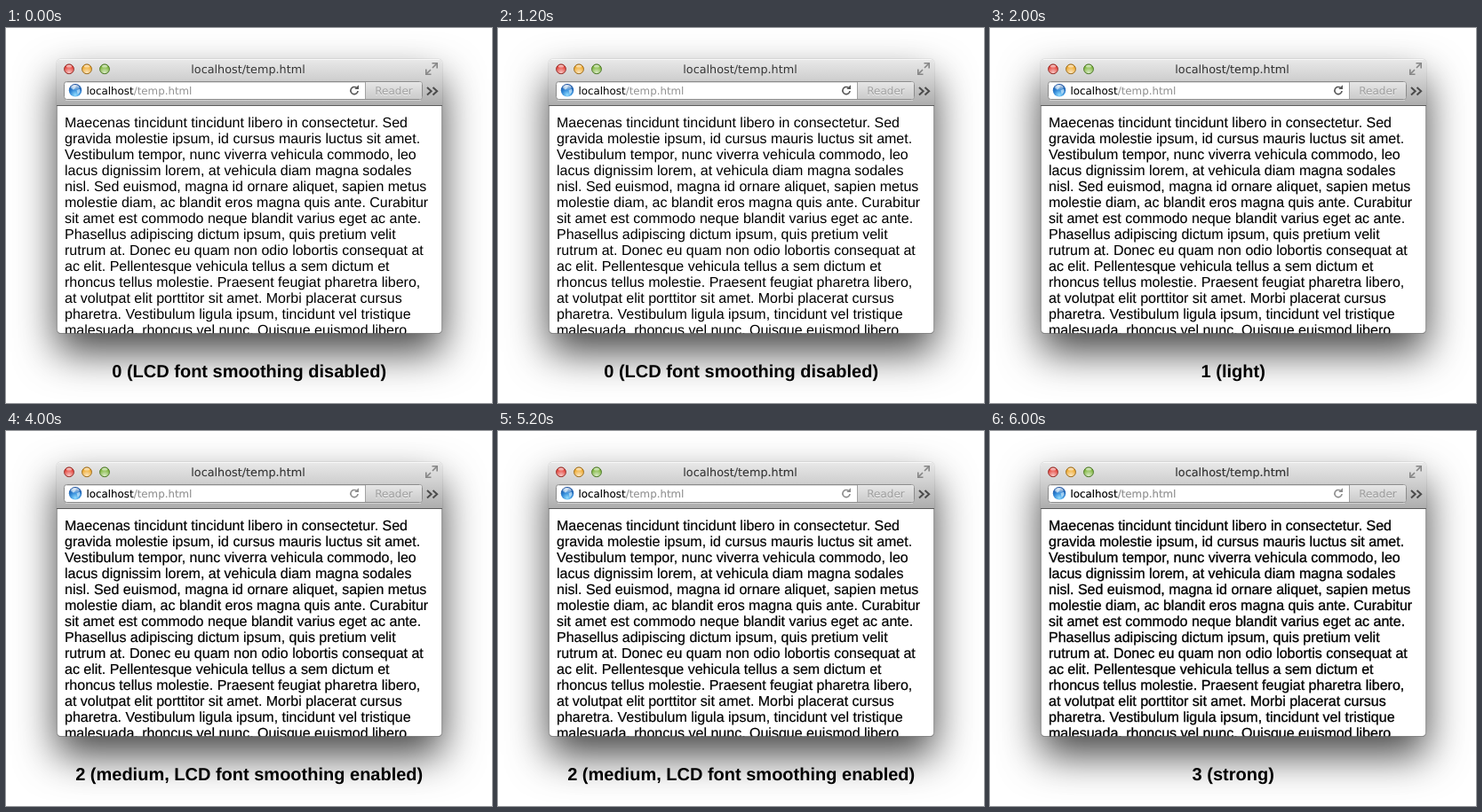
Write an HTML page that moves like this. It is 547x423 px and loops after 8 s.

```html
<!DOCTYPE html>
<html lang="en">
<head>
<meta charset="utf-8">
<title>Font smoothing levels</title>
<style>
html, body { margin: 0; width: 100%; height: 100%; overflow: hidden; background: #fff; }
#shadow {
  position: absolute; left: 57px; top: 35px; width: 434px; height: 309px;
  border-radius: 5px; box-shadow: 0 22px 46px rgba(0,0,0,.72), 0 0 1px rgba(0,0,0,.5);
}
svg { position: absolute; left: 0; top: 0; display: block; }
text { text-rendering: geometricPrecision; white-space: pre; }
.ui { font-family: "DejaVu Sans", sans-serif; stroke-width: calc(var(--w) * .6); }
.page { font: 16px "Liberation Sans", Arial, sans-serif; fill: #000; stroke: #000; stroke-width: var(--w); }
.caption { font: bold 20px "Liberation Sans", Arial, sans-serif; text-anchor: middle; }
</style>
</head>
<body>
<div id="shadow"></div>
<svg id="stage" width="547" height="423" viewBox="0 0 547 423">
  <defs>
    <linearGradient id="chrome" x2="0" y2="1">
      <stop offset="0" stop-color="#e9e9e9"/>
      <stop offset=".45" stop-color="#cfcfcf"/>
      <stop offset="1" stop-color="#adadad"/>
    </linearGradient>
    <linearGradient id="button" x2="0" y2="1">
      <stop offset="0" stop-color="#e6e6e6"/>
      <stop offset="1" stop-color="#cbcbcb"/>
    </linearGradient>
    <linearGradient id="gloss" x2="0" y2="1">
      <stop offset="0" stop-color="#fff" stop-opacity=".85"/>
      <stop offset="1" stop-color="#fff" stop-opacity=".1"/>
    </linearGradient>
    <radialGradient id="globe" cx=".5" cy=".85" r=".85">
      <stop offset="0" stop-color="#8fdcff"/>
      <stop offset=".5" stop-color="#2f86d6"/>
      <stop offset="1" stop-color="#174a98"/>
    </radialGradient>
    <radialGradient id="lamp" cx=".5" cy=".9" r=".7">
      <stop offset="0" stop-color="#fff" stop-opacity=".7"/>
      <stop offset="1" stop-color="#fff" stop-opacity="0"/>
    </radialGradient>
    <clipPath id="frame"><rect x="57" y="35" width="434" height="309.5" rx="5"/></clipPath>
  </defs>

  <g clip-path="url(#frame)">
    <rect x="57" y="35" width="434" height="310" fill="#fff"/>
    <rect x="57" y="35" width="434" height="52" fill="url(#chrome)"/>
    <path d="M60 35.5H488" stroke="#f8f8f8"/>
    <path d="M57 87.5H491" stroke="#5c5c5c"/>
    <g id="lights"></g>

    <text class="ui" x="272.5" y="51" font-size="12.8" text-anchor="middle" fill="#fff" opacity=".5">localhost/temp.html</text>
    <text class="ui" x="272.5" y="50.5" font-size="12.8" text-anchor="middle" fill="#333" stroke="#333">localhost/temp.html</text>

    <g fill="none" stroke="#858585" stroke-width="1.6">
      <path d="M480 45L484.5 40.5M478 47L473.5 51.5"/>
      <path d="M479.5 39.8H485.2V45.5M472.8 46.5V52.2H478.5"/>
    </g>

    <rect x="65.5" y="60.5" width="403" height="20" rx="3" fill="#fff" stroke="#8b8b8b"/>
    <path d="M67 61.5H404" stroke="#ddd"/>
    <path d="M404.5 61H466Q468 61 468 63V78Q468 80 466 80H404.5Z" fill="url(#button)"/>
    <path d="M404.5 61V80" stroke="#a2a2a2"/>
    <path d="M67 81.5H467" stroke="#fff" opacity=".4"/>

    <circle cx="78" cy="70.3" r="7.2" fill="url(#globe)"/>
    <path d="M74 67Q76 63.8 79 65.2L78 68L75.5 69.8ZM79.5 70L83 68.8L83.6 72L80.8 75Z" fill="#d9f1ff" opacity=".65"/>
    <ellipse cx="77.7" cy="67" rx="5" ry="3" fill="url(#gloss)"/>

    <text class="ui" x="90.5" y="75" font-size="11.85" fill="#000" stroke="#000">localhost<tspan fill="#929292" stroke="#929292">/temp.html</tspan></text>

    <g id="reload" fill="none" stroke="currentColor" stroke-width="1.6">
      <path d="M394.4 67.2A4.1 4.1 0 1 0 396.1 71"/>
      <path d="M392.3 69.1H397V64.3Z" fill="currentColor" stroke="none"/>
    </g>

    <text class="ui" x="436.5" y="76" font-size="12" text-anchor="middle" fill="#fff" opacity=".7">Reader</text>
    <text class="ui" x="436.5" y="75" font-size="12" text-anchor="middle" fill="#a0a0a0" stroke="#a0a0a0">Reader</text>
    <path d="M474 67L478.7 71.3L474 75.6M480.5 67L485.2 71.3L480.5 75.6" fill="none" stroke="#4b4b4b" stroke-width="2"/>

    <g id="page" class="page"></g>
  </g>
  <path d="M57.5 88V340Q57.5 344.5 62 344.5H486Q490.5 344.5 490.5 340V88" fill="none" stroke="#444" stroke-opacity=".5"/>
  <text id="caption" class="caption" x="273.7" y="394"></text>
</svg>

<script>
const NS = "http://www.w3.org/2000/svg";
const $ = id => document.getElementById(id);

function add(parent, tag, attrs, text = "") {
  const el = document.createElementNS(NS, tag);
  for (const key in attrs) el.setAttribute(key, attrs[key]);
  el.textContent = text;
  parent.append(el);
}

const lines = [
  "Maecenas tincidunt tincidunt libero in consectetur. Sed",
  "gravida molestie ipsum, id cursus mauris luctus sit amet.",
  "Vestibulum tempor, nunc viverra vehicula commodo, leo",
  "lacus dignissim lorem, at vehicula diam magna sodales",
  "nisl. Sed euismod, magna id ornare aliquet, sapien metus",
  "molestie diam, ac blandit eros magna quis ante. Curabitur",
  "sit amet est commodo neque blandit varius eget ac ante.",
  "Phasellus adipiscing dictum ipsum, quis pretium velit",
  "rutrum at. Donec eu quam non odio lobortis consequat at",
  "ac elit. Pellentesque vehicula tellus a sem dictum et",
  "rhoncus tellus molestie. Praesent feugiat pharetra libero,",
  "at volutpat elit porttitor sit amet. Morbi placerat cursus",
  "pharetra. Vestibulum ligula ipsum, tincidunt vel tristique",
  "malesuada, rhoncus vel nunc. Quisque euismod libero"
];
lines.forEach((line, i) => add($("page"), "text", { x: 66, y: 112 + 18 * i }, line));

[["#e5473f", "#8f2f2a"], ["#f0ad35", "#98691d"], ["#83b944", "#4b7528"]].forEach(([fill, stroke], i) => {
  const cx = 71 + 20 * i;
  add($("lights"), "circle", { cx, cy: 46.3, r: 5.4, fill, stroke });
  add($("lights"), "circle", { cx, cy: 46.3, r: 5, fill: "url(#lamp)" });
  add($("lights"), "ellipse", { cx, cy: 43.6, rx: 3, ry: 1.8, fill: "url(#gloss)" });
});

const STEP = 2000;
const levels = [
  { caption: "0 (LCD font smoothing disabled)", weight: 0, icon: "#555" },
  { caption: "1 (light)", weight: 0.1, icon: "#555" },
  { caption: "2 (medium, LCD font smoothing enabled)", weight: 0.2, icon: "#8c8c8c" },
  { caption: "3 (strong)", weight: 0.32, icon: "#8c8c8c" }
];
let shown = -1;

function show(index) {
  if (index === shown) return;
  shown = index;
  const { caption, weight, icon } = levels[index];
  $("caption").textContent = caption;
  $("stage").style.setProperty("--w", weight + "px");
  $("reload").style.color = icon;
}

const start = performance.now();
function tick() {
  const time = Math.max(0, performance.now() - start);
  show(Math.floor(time / STEP) % levels.length);
  requestAnimationFrame(tick);
}
tick();
</script>
</body>
</html>
```
